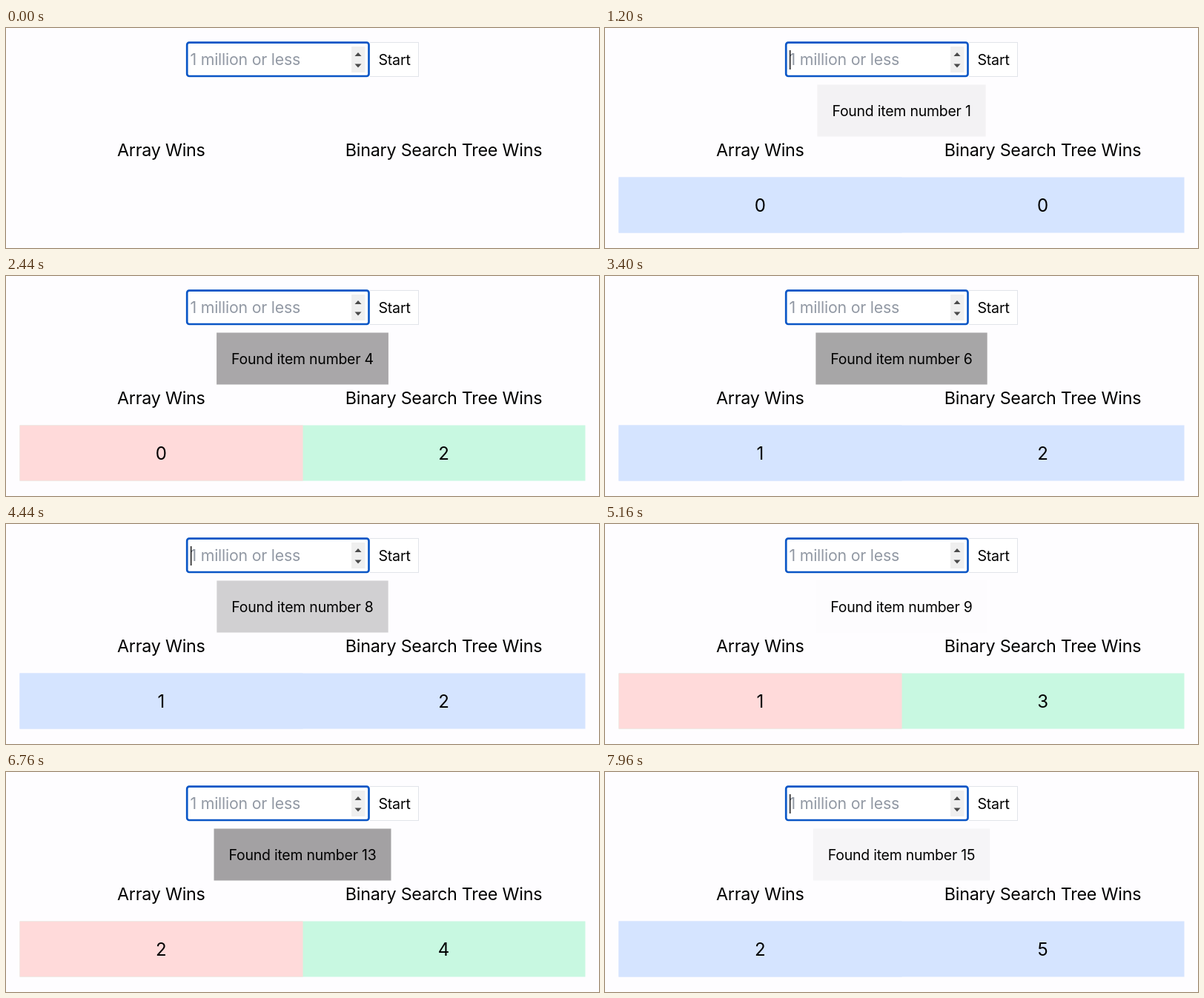
These frames come from a looping animation (800x297 px, 8000 ms). An HTML page with a canvas:

```html
<!DOCTYPE html>
<html lang="en">
<head>
<meta charset="utf-8">
<title>Array vs binary search tree</title>
<style>
  html, body { margin: 0; width: 100%; height: 100%; overflow: hidden; background: #fefdff; }
  canvas { display: block; width: 800px; height: 297px; }
</style>
</head>
<body>
<canvas id="stage"></canvas>
<script>
const W = 800, H = 297, LOOP = 8000;
const FIRST = 866, STEP = 481, FADE = 500;
const BLINK = 800;
// One letter per search: A = array wins, B = tree wins, dot = tie
const RESULTS = '.B.BA...BA..BB.';

const PAGE = '#fefdff', BLUE = '#d5e4ff', RED = '#ffdada', GREEN = '#c8f8e1';
const FADE_FROM = [102, 100, 101], FADE_TO = [254, 253, 255];

const canvas = document.getElementById('stage');
const ctx = canvas.getContext('2d');
const ratio = window.devicePixelRatio || 1;
canvas.width = Math.round(W * ratio);
canvas.height = Math.round(H * ratio);
ctx.scale(ratio, ratio);

// CSS "ease": cubic-bezier(.25, .1, .25, 1)
function ease(x) {
  if (x <= 0) return 0;
  if (x >= 1) return 1;
  const curve = (u, a, b) => 3 * (1 - u) ** 2 * u * a + 3 * (1 - u) * u * u * b + u ** 3;
  let lo = 0, hi = 1;
  for (let i = 0; i < 24; i++) {
    const mid = (lo + hi) / 2;
    if (curve(mid, 0.25, 0.25) < x) lo = mid; else hi = mid;
  }
  return curve(lo, 0.1, 1);
}

function setFont(size) {
  ctx.font = `${size}px Inter, "Open Sans", sans-serif`;
  ctx.letterSpacing = `${-0.01 * size}px`;
}

function text(str, x, y, size, align = 'center', color = '#000') {
  setFont(size);
  ctx.textAlign = align;
  ctx.fillStyle = color;
  ctx.fillText(str, x, y);
}

function rect(x, y, w, h, color) {
  ctx.fillStyle = color;
  ctx.fillRect(x, y, w, h);
}

function triangle(x, base, tip) {
  ctx.fillStyle = '#4a4a4a';
  ctx.beginPath();
  ctx.moveTo(x - 4.5, base);
  ctx.lineTo(x + 4.5, base);
  ctx.lineTo(x, tip);
  ctx.fill();
}

function drawForm(t) {
  rect(491, 19, 66, 47, '#e2e4ea');
  rect(491, 20, 65, 45, '#fff');
  text('Start', 524, 50, 19.6);

  ctx.beginPath();
  ctx.roundRect(244.2, 19.7, 245.3, 45.3, 3);
  ctx.fillStyle = '#fff';
  ctx.fill();
  ctx.lineWidth = 2.7;
  ctx.strokeStyle = '#0a56c6';
  ctx.stroke();

  rect(466, 25, 18.5, 35, '#efefef');
  triangle(475, 38, 33);
  triangle(475, 48.5, 53.5);
  text('1 million or less', 248.5, 50, 21.3, 'left', '#9299a4');

  const blink = t % BLINK;
  if (blink >= 380 && blink < 780) rect(249, 30, 1.3, 26, '#000');
}

function drawMessage(item, age) {
  const label = `Found item number ${item}`;
  const k = ease(age / FADE);
  const shade = FADE_FROM.map((c, i) => Math.round(c + (FADE_TO[i] - c) * k));
  setFont(19.4);
  const width = ctx.measureText(label).width + 40;
  rect(400 - width / 2, 76.5, width, 70, `rgb(${shade})`);
  text(label, 400, 118.8, 19.4);
}

function drawScore(item) {
  const done = RESULTS.slice(0, item);
  const wins = who => done.split(who).length - 1;
  const last = done[item - 1];
  const color = who => last === '.' ? BLUE : last === who ? GREEN : RED;
  rect(18.5, 201.5, 763, 75, color('B'));
  rect(18.5, 201.5, 382, 75, color('A'));
  text(wins('A'), 209.3, 248, 24);
  text(wins('B'), 590.5, 248, 24);
}

function draw(t) {
  rect(0, 0, W, H, PAGE);
  drawForm(t);
  if (t >= FIRST) {
    const index = Math.min(Math.floor((t - FIRST) / STEP), RESULTS.length - 1);
    drawMessage(index + 1, t - FIRST - index * STEP);
    drawScore(index + 1);
  }
  text('Array Wins', 209.3, 173, 23.3);
  text('Binary Search Tree Wins', 590.5, 173, 23.3);
}

const start = performance.now();
function frame() {
  draw((performance.now() - start) % LOOP);
  requestAnimationFrame(frame);
}
frame();
</script>
</body>
</html>
```
